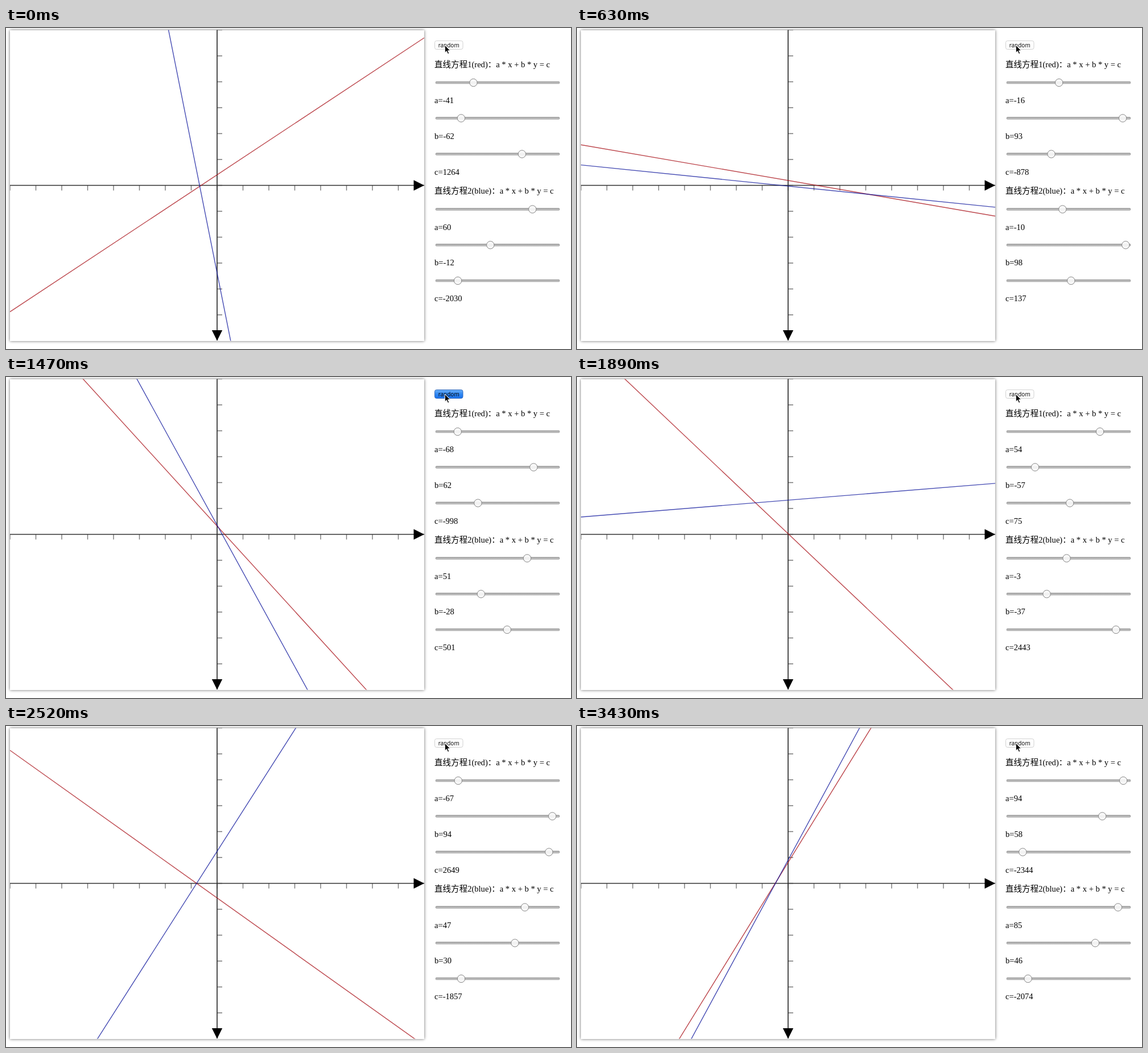
Recreate the animation shown at these times as an HTML page. Size 993 px wide and 564 px high, loop 3.5 s.

```html
<!DOCTYPE html>
<html lang="zh-CN">
<head>
<meta charset="utf-8">
<title>Two lines</title>
<style>
html, body { margin: 0; width: 100%; height: 100%; overflow: hidden; background: #fff; }
#board {
  position: absolute; left: 7px; top: 3.5px; width: 728px; height: 546px;
  background: #fff; box-shadow: 0 0 5px rgba(0, 0, 0, .6);
}
svg { position: absolute; left: 0; top: 0; display: block; }
text { font: 14.56px "Liberation Serif", "Noto Sans CJK SC", "Noto Sans CJK", serif; fill: #000; }
#label { font: 10px "Open Sans", "DejaVu Sans", sans-serif; }
</style>
</head>
<body>
<div id="board"></div>
<svg id="stage" width="993" height="564" viewBox="0 0 993 564">
  <defs>
    <clipPath id="clip"><rect x="7" y="3.5" width="728" height="546"/></clipPath>
    <linearGradient id="knob" x2="0" y2="1">
      <stop offset="0" stop-color="#fff"/><stop offset=".5" stop-color="#f1f1f1"/><stop offset="1" stop-color="#fcfcfc"/>
    </linearGradient>
    <linearGradient id="track" x2="0" y2="1">
      <stop offset="0" stop-color="#9c9c9c"/><stop offset="1" stop-color="#d8d8d8"/>
    </linearGradient>
    <linearGradient id="up" x2="0" y2="1">
      <stop offset="0" stop-color="#fff"/><stop offset="1" stop-color="#fbfbfb"/>
    </linearGradient>
    <linearGradient id="down" x2="0" y2="1">
      <stop offset="0" stop-color="#6cb0f8"/><stop offset=".5" stop-color="#3088f2"/><stop offset="1" stop-color="#1a70ea"/>
    </linearGradient>
  </defs>
  <g id="plot" clip-path="url(#clip)"></g>
  <g id="panel"></g>
</svg>
<script>
const LOOP = 3500, STEP = 70, PRESS = 140;
const CX = 371, CY = 276.5, SCALE = 0.91, HALF = 400;

// start time, then a, b, c of the red and of the blue line
const STATES = [
  [0, -41, -62, 1264, 60, -12, -2030],
  [420, -16, 93, -878, -10, 98, 137],
  [1050, -68, 62, -998, 51, -28, 501],
  [1540, 54, -57, 75, -3, -37, 2443],
  [2240, -67, 94, 2649, 47, 30, -1857],
  [2800, 4, -33, 2391, 22, -43, -1449],
  [3290, 94, 58, -2344, 85, 46, -2074]
];
const ROWS = [96, 158.5, 221.5, 318.5, 381.3, 444];

const plot = document.getElementById("plot");
const panel = document.getElementById("panel");

function add(parent, tag, attrs, text) {
  const el = document.createElementNS("http://www.w3.org/2000/svg", tag);
  for (const k in attrs) el.setAttribute(k, attrs[k]);
  if (text) el.textContent = text;
  parent.appendChild(el);
  return el;
}

function drawAxes() {
  let ticks = "";
  for (let i = -8; i < 8; i++) ticks += `M${CX + i * 45.5} ${CY}v9`;
  for (let i = -6; i < 6; i++) ticks += `M${CX} ${CY + i * 45.5}h9`;
  add(plot, "path", { d: ticks, stroke: "#777", "stroke-width": 1.4 });
  add(plot, "path", { d: `M7 ${CY}H735M${CX} 3V549`, stroke: "#303030", "stroke-width": 1.7 });
  add(plot, "path", { d: `M735 ${CY}l-18.5 -9.2v18.4zM${CX} 549.5l-9.2 -18.5h18.4z` });
}

const makeLine = color => add(plot, "path", { stroke: color, "stroke-width": 1.4, "stroke-opacity": .76 });

function makeSlider(y) {
  add(panel, "rect", {
    x: 755.3, y: y - 1.7, width: 217.4, height: 3.4, rx: 1,
    fill: "url(#track)", stroke: "#8f8f8f", "stroke-width": .8
  });
  const knob = add(panel, "circle", { cy: y, r: 6.7, fill: "url(#knob)", stroke: "#858585", "stroke-width": 1 });
  const label = add(panel, "text", { x: 753, y: y + 36 });
  return { knob, label };
}

drawAxes();
const lines = [makeLine("#a80c14"), makeLine("#0c149c")];

const button = add(panel, "rect", { x: 753.5, y: 22.5, width: 49.5, height: 15, rx: 3.2, "stroke-width": .9 });
add(panel, "text", { id: "label", x: 778.2, y: 33.8, "text-anchor": "middle" }, "random");
add(panel, "text", { x: 753, y: 68.5 }, "直线方程1(red)：a * x + b * y = c");
add(panel, "text", { x: 753, y: 291.3 }, "直线方程2(blue)：a * x + b * y = c");
const sliders = ROWS.map(makeSlider);
add(panel, "path", {
  d: "M771.3 30V43.4L774.3 40.6L776.6 45.6L778.8 44.6L776.6 39.8H780.6Z",
  stroke: "#fff", "stroke-width": 1, "stroke-linejoin": "round"
});

// a x + b y = c across the full width of the board
function linePath(a, b, c) {
  const point = x => `${CX + x * SCALE} ${CY + (c - a * x) / b * SCALE}`;
  return `M${point(-HALF)}L${point(HALF)}`;
}

function show(values) {
  lines.forEach((line, i) => line.setAttribute("d", linePath(...values.slice(i * 3, i * 3 + 3))));
  sliders.forEach(({ knob, label }, i) => {
    const limit = i % 3 === 2 ? 3000 : 100;
    knob.setAttribute("cx", 863.6 + values[i] / limit * 102.7);
    label.textContent = "abc"[i % 3] + "=" + values[i];
  });
}

function setPressed(on) {
  button.setAttribute("fill", on ? "url(#down)" : "url(#up)");
  button.setAttribute("stroke", on ? "#2a62b8" : "#cfcfcf");
}

let shown = -1;
function frame(now) {
  const t = Math.floor(now % LOOP / STEP) * STEP;
  let index = STATES.length - 1;
  while (STATES[index][0] > t) index--;
  if (index !== shown) show(STATES[index].slice(1));
  shown = index;
  const next = STATES[index + 1];
  setPressed(!!next && t >= next[0] - PRESS);
  requestAnimationFrame(frame);
}
frame(0);
</script>
</body>
</html>
```
